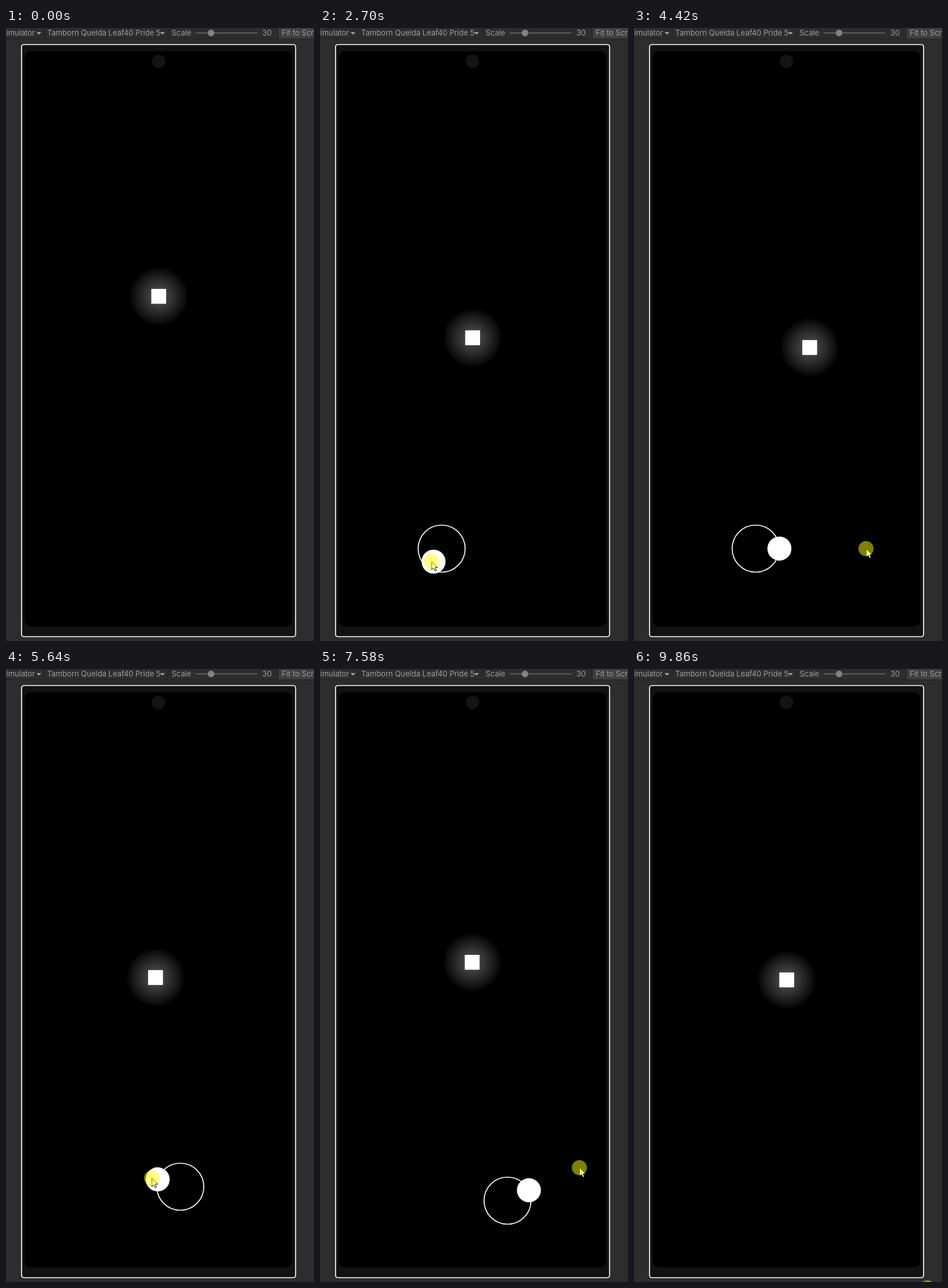
Write an HTML page that moves like this. It is 531 px wide and 1055 px high and loops after 9930 ms.

```html
<!DOCTYPE html>
<html lang="en">
<head>
<meta charset="utf-8">
<title>Joystick simulator</title>
<style>
html, body { margin: 0; width: 100%; height: 100%; overflow: hidden; background: #2d2d2d; }
svg { display: block; }
text { font: 13px Inter, Roboto, sans-serif; fill: #9c9c9c; }
</style>
</head>
<body>
<svg width="531" height="1055" viewBox="0 0 531 1055">
  <defs>
    <radialGradient id="glow">
      <stop offset="0" stop-color="#fff" stop-opacity=".34"/>
      <stop offset=".5" stop-color="#fff" stop-opacity=".18"/>
      <stop offset=".9" stop-color="#fff" stop-opacity=".045"/>
      <stop offset="1" stop-color="#fff" stop-opacity="0"/>
    </radialGradient>
  </defs>

  <rect x="470" width="61" height="18" fill="#404040"/>
  <path d="M66.5 0V18M279.5 0V18M469.5 0V18M0 18.5H531" stroke="#222"/>
  <text x="50" y="13" text-anchor="end">Simulator</text>
  <text x="71" y="13">Tamborn Quelda Leaf40 Pride 5</text>
  <text x="285.5" y="13">Scale</text>
  <text x="442" y="13">30</text>
  <text x="475.5" y="13">Fit to Screen</text>
  <path d="M52.5 7h8.5l-4.25 4.5zM265.5 7h8.5l-4.25 4.5z" fill="#9c9c9c"/>
  <path d="M327 8.5H433" stroke="#5e5e5e" stroke-width="2"/>
  <circle cx="353.5" cy="8.5" r="5.7" fill="#828282"/>

  <rect x="26.8" y="28.5" width="472.5" height="1019" rx="4" fill="#121212" stroke="#fff" stroke-width="1.7"/>
  <rect x="32" y="40" width="461.5" height="990" rx="10"/>
  <circle cx="263" cy="57.5" r="11.5" fill="#141414"/>

  <g id="player">
    <circle r="51" fill="url(#glow)"/>
    <rect x="-12.8" y="-12.8" width="25.6" height="25.6" fill="#fff"/>
  </g>
  <g id="stick">
    <circle r="40.5" fill="none" stroke="#fff" stroke-width="1.7"/>
    <circle id="knob" r="20.7" fill="#fff"/>
  </g>
  <g id="cursor">
    <path d="M.5 .5v14l3.2-2.8 2.5 5 2.5-1.2-2.4-4.8h4.2z" fill="#fff" stroke="#000"/>
    <circle r="13" fill="#ff0" fill-opacity=".5"/>
  </g>
</svg>
<script>
const LOOP = 9930, STEP = 68.75, REACH = 41, LAG = .2;
const $ = id => document.getElementById(id);
const move = (id, [x, y]) => $(id).setAttribute('transform', `translate(${x} ${y})`);

// Clockwise lap of 18 steps, as keys; angles in degrees
const lap = (x, y, rx, ry, from) => Array.from({ length: 9 }, (_, i) => {
  const a = (from + 60 * i) * Math.PI / 180;
  return [110 + 3 * i, x + rx * Math.cos(a), y + ry * Math.sin(a)];
});

// Turning points as [step, x, y]
const cursor = [
  [0, -40, 990], [1, 44, 988], [7, 209.7, 896], [19, 218, 1028], [27, 216.5, 852],
  [37, 214, 921], [44, 106, 905], [49, 247, 994], [56, 396, 830], [64, 400, 896],
  [70, 240, 800], [75, 160, 970], [79, 300.5, 891], [82, 251, 876], [90, 101, 905],
  [97, 323.3, 915], [106, 335, 815], ...lap(322, 890, 135, 85, -22), [143, 506, 1065]
];
const player = [
  [7, 263.3, 461.8], [22, 266, 543], [27, 266, 517.2], [33, 265, 505], [41, 262, 541],
  [49, 232.6, 551], [64, 302.9, 549.9], [72, 290, 508], [82, 257.8, 531], [93, 204, 530],
  [105, 244, 529], ...lap(268, 518.7, 15, 15, -112), [138, 263.3, 535.1]
];
// First and last step of each touch; the ring opens under the cursor
const touches = [[7, 76], [79, 92], [97, 137]];

// Smooth path through the keys, flat at each axis extreme
function at(keys, s) {
  const last = keys.length - 1;
  if (s >= keys[last][0]) return keys[last].slice(1);
  const i = Math.max(0, keys.findIndex(k => k[0] > s) - 1);
  const a = keys[i], b = keys[i + 1], h = b[0] - a[0], u = Math.max(0, (s - a[0]) / h);
  const slope = (n, c) => n < 0 || n >= last ? 0
    : (keys[n + 1][c] - keys[n][c]) / (keys[n + 1][0] - keys[n][0]);
  const tangent = (n, c) => {
    const p = slope(n - 1, c), q = slope(n, c);
    return p * q > 0 ? 2 * p * q / (p + q) : 0;
  };
  return [1, 2].map(c => a[c] + (b[c] - a[c]) * u * u * (3 - 2 * u)
    + h * u * (1 - u) * ((1 - u) * tangent(i, c) - u * tangent(i + 1, c)));
}

function draw(time) {
  const s = Math.floor(time % LOOP / STEP);
  move('player', at(player, s));
  move('cursor', at(cursor, s));
  const touch = touches.find(([from, to]) => s >= from && s < to);
  $('stick').style.display = touch ? '' : 'none';
  if (!touch) return;
  const ring = at(cursor, touch[0]);
  const [x, y] = at(cursor, Math.max(touch[0], s - LAG));
  const dx = x - ring[0], dy = y - ring[1];
  const k = Math.min(1, REACH / (Math.hypot(dx, dy) || 1));
  move('stick', ring);
  move('knob', [dx * k, dy * k]);
}

const start = performance.now();
function tick() {
  draw(performance.now() - start);
  requestAnimationFrame(tick);
}
tick();
</script>
</body>
</html>
```
